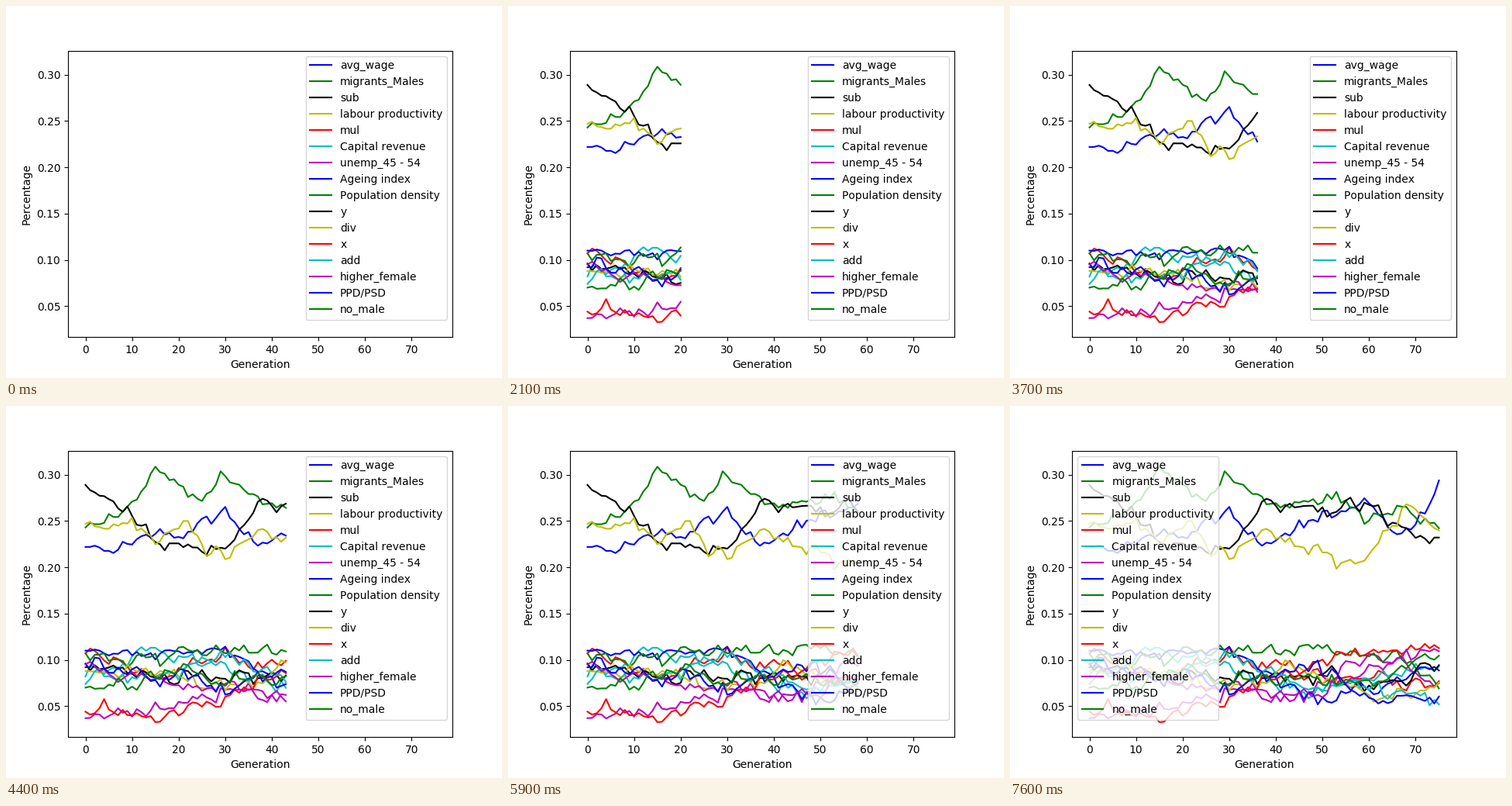
These frames come from a looping animation (640 by 480 pixels, 10000 ms). A matplotlib script:

```python
import numpy as np
import matplotlib.pyplot as plt
from matplotlib.animation import FuncAnimation

GENERATIONS = 76
FRAMES = 100
INTERVAL = 100
LOW, HIGH = 0.0306, 0.312

# Unadjusted glyph spacing, as in classic text layout
plt.rcParams["text.kerning_factor"] = 6

# Levels in thousandths, evenly spread over the whole run
LEVELS = {
    "avg_wage": (222, 222, 238, 247, 267, 222, 246, 256, 268, 232, 290),
    "migrants_Males": (243, 256, 304, 278, 298, 271, 268, 286, 248, 268, 240),
    "sub": (289, 270, 230, 224, 220, 269, 262, 255, 272, 244, 234),
    "labour productivity": (247, 250, 231, 249, 214, 238, 225, 208, 210, 264, 240),
    "mul": (107, 83, 105, 85, 79, 77),
    "Capital revenue": (82, 112, 93, 62, 86, 92),
    "unemp_45 - 54": (37, 52, 68, 62, 110, 75),
    "Ageing index": (110, 112, 113, 62, 66, 92),
    "Population density": (107, 104, 105, 114, 106, 78),
    "y": (96, 84, 74, 87, 76, 87),
    "div": (88, 86, 70, 98, 58, 75),
    "x": (44, 45, 57, 89, 106, 118),
    "add": (74, 79, 107, 72, 66, 57),
    "higher_female": (95, 76, 66, 68, 86, 117),
    "PPD/PSD": (92, 86, 72, 94, 60, 56),
    "no_male": (70, 85, 77, 84, 79, 100),
}

gens = np.arange(GENERATIONS)
rng = np.random.default_rng(7)


def wander(size=4.5, memory=0.5):
    """Random drift that starts at zero and keeps returning to it."""
    drift = np.zeros(GENERATIONS)
    for g in gens[1:]:
        drift[g] = memory * drift[g - 1] + rng.normal(0, size)
    return drift


def share(levels):
    """Percentage per generation: a trend through the levels plus drift."""
    trend = np.interp(gens, np.linspace(0, GENERATIONS - 1, len(levels)), levels)
    return np.clip((trend + wander()) / 1000, LOW, HIGH)


fig, ax = plt.subplots(figsize=(6.4, 4.8), dpi=100)
ax.set_xlim(-3.75, 78.75)
ax.set_ylim(0.01655, 0.32605)
ax.set_xlabel("Generation")
ax.set_ylabel("Percentage")

curves = []
for i, (label, levels) in enumerate(LEVELS.items()):
    (line,) = ax.plot([], [], color="bgkyrcm"[i % 7], label=label)
    curves.append((line, share(levels)))

legend = ax.legend(loc="upper right")


def draw(frame):
    count = min(frame, GENERATIONS)
    for line, values in curves:
        line.set_data(gens[:count], values[:count])
    legend.set_loc("upper left" if count == GENERATIONS else "upper right")
    return []


anim = FuncAnimation(fig, draw, frames=FRAMES, interval=INTERVAL,
                     repeat=True, repeat_delay=0, blit=False)
plt.show()
```
